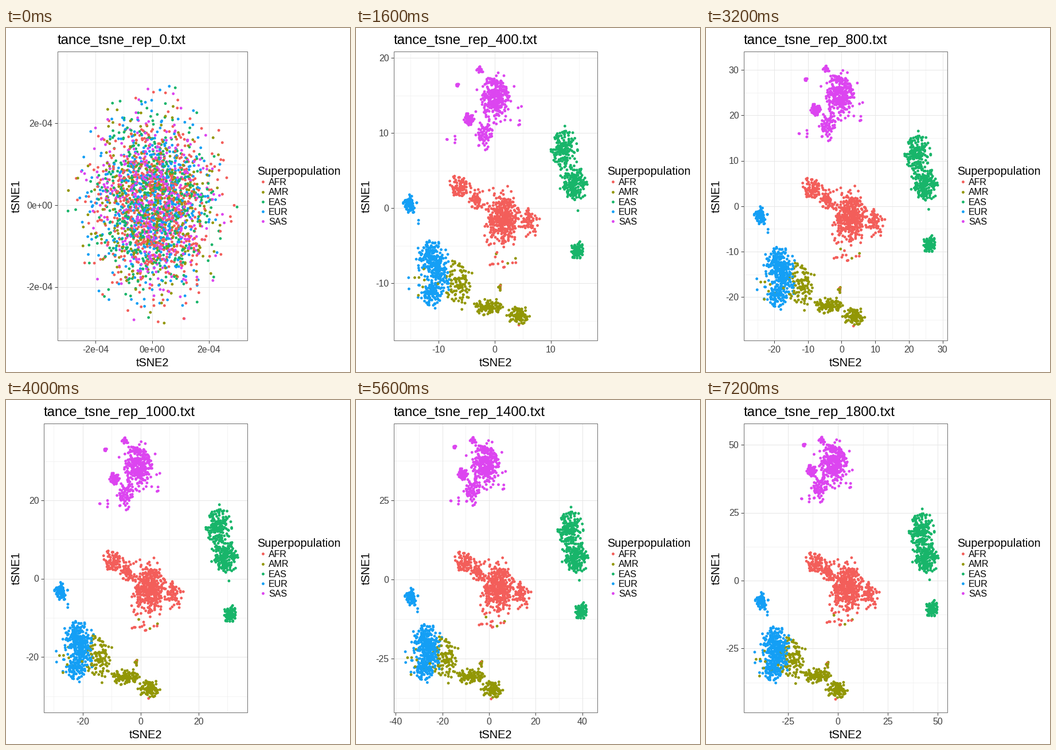
Recreate the animation shown at these times as a matplotlib script. Size 600 px wide and 600 px high, loop 8000 ms.

```python
import math

import matplotlib.pyplot as plt
import numpy as np
from matplotlib.animation import FuncAnimation
from matplotlib.patches import Rectangle

SIZE = 600
PT = 0.72  # points per pixel at 100 dpi
TOP, RIGHT, BOTTOM = 41, 421, 545
REPS = range(0, 2000, 200)
COLORS = {"AFR": "#F35E5A", "AMR": "#929705", "EAS": "#18B56A",
          "EUR": "#149FF5", "SAS": "#DC45F0"}
GREY = "#404040"

rng = np.random.default_rng(11)
early, middle, late, names = [], [], [], []


def spread(n, limit):
    """Normal scatter with the far points pulled in."""
    xy = rng.normal(size=(n, 2))
    r = np.hypot(*xy.T)[:, None]
    return np.where(r > limit, xy * 0.6, xy)


def cluster(pop, n, sd, a, b, c, first_sd=None, tilt=0):
    """Cloud centred at a (step 200), b (step 400) and c (step 1800)."""
    unit = spread(n, 2.5)
    first = unit * (first_sd or sd)
    first[:, 1] += tilt * first[:, 0]
    early.append(first + a)
    middle.append(unit * sd + b)
    late.append(unit * sd * 0.95 + c)
    names.extend([pop] * n)


cluster("AFR", 360, (13, 18), (251, 347), (256, 332), (246, 326))
cluster("AFR", 65, (19, 29), (250, 355), (252, 337), (242, 333))
cluster("AFR", 90, (8, 10), (169, 285), (181, 278), (191, 285), (8, 7), 0.6)
cluster("AFR", 60, (6, 9), (198, 313), (210, 299), (213, 299), (5, 5))
cluster("AFR", 70, (7, 12), (304, 343), (303, 338), (286, 340))
cluster("AFR", 9, (13, 5), (262, 420), (258, 412), (234, 387))
cluster("AFR", 3, (0.7, 3), (253, 466), (251, 455), (211, 464))
cluster("AFR", 1, (1, 1), (299, 501), (283, 517), (225, 521))

cluster("AMR", 105, (11, 19), (177, 456), (178, 446), (150, 452))
cluster("AMR", 110, (12, 7), (236, 503), (231, 488), (194, 482), (15, 4))
cluster("AMR", 115, (8.5, 7), (290, 498), (284, 501), (229, 505), (12, 2), -0.32)
cluster("AMR", 6, (1.5, 5), (250, 460), (251, 452), (212, 461))
cluster("AMR", 8, (14, 20), (118, 438), (121, 432), (105, 449))
cluster("AMR", 3, (12, 8), (255, 410), (257, 405), (235, 386))

cluster("EAS", 185, (10, 16), (361, 215), (362, 209), (375, 226))
cluster("EAS", 220, (10, 15), (379, 284), (380, 270), (383, 273))
cluster("EAS", 98, (5.3, 6.7), (390, 393), (386, 388), (394, 364), (1.2, 4))
cluster("EAS", 1, (1, 1), (385, 339), (386, 319), (389, 314))

cluster("EUR", 98, (5, 7.3), (81, 313), (94, 307), (97, 351), (2.4, 1.2), 1.6)
cluster("EUR", 195, (12, 15), (124, 396), (132, 401), (121, 424), (11, 11))
cluster("EUR", 100, (10, 11), (126, 473), (130, 463), (114, 469), (8, 9))
cluster("EUR", 105, (10, 15), (138, 438), (145, 432), (126, 448))
cluster("EUR", 2, (2, 5), (100, 348), (111, 340), (109, 374))
cluster("EUR", 2, (5, 25), (86, 430), (95, 420), (88, 425))

cluster("SAS", 260, (11, 19), (241, 161), (243, 121), (223, 110), (12, 17))
cluster("SAS", 55, (16, 24), (240, 160), (243, 128), (219, 114))
cluster("SAS", 65, (4, 5), (198, 206), (197, 160), (184, 124), (4, 1))
cluster("SAS", 75, (7, 11), (235, 225), (224, 186), (198, 153), (6, 11))
cluster("SAS", 18, (2.8, 3.2), (219, 65), (216, 73), (202, 70), (0.4, 0.4))
cluster("SAS", 8, (1.3, 1.3), (184, 169), (178, 100), (172, 79), (0.4, 0.4))
cluster("SAS", 5, (8, 6), (151, 211), (160, 191), (168, 169), (3, 0.3))
cluster("SAS", 5, (3, 22), (280, 225), (283, 163), (250, 147), (4, 20))

early, middle, late = (np.vstack(part) for part in (early, middle, late))
start = spread(len(names), 3) * (49.7, 71.3) + (255, 309)
order = rng.permutation(len(names))
dot_colors = [COLORS[names[k]] for k in order]


def growth(rep):
    """0 at step 400, 1 at step 1800, on a log scale."""
    return math.log(rep / 400) / math.log(4.5)


def positions(rep):
    if rep < 400:
        return early if rep else start
    return middle + (late - middle) * growth(rep)


def axes_for(rep):
    """Panel left edge, then zero pixel and data span of each axis."""
    if rep == 0:
        return 90, (255, 6.68e-4), (309, 7.06e-4)
    if rep == 200:
        return 61, (240, 15.6), (328, 18.4)
    grown = math.sqrt(rep) - 20
    y0 = np.interp(rep, [400, 600, 1800], [314.3, 310, 315])
    return (66, (242 - 12 * growth(rep), 36.2 + 2.93 * grown),
            (y0, 38.5 + 3.03 * grown))


def nice_step(span):
    """Break distance that gives three to six labels."""
    unit = 10 ** math.floor(math.log10(span))
    for limit, step in [(1.1, 0.25), (1.7, 0.4), (3, 0.5), (6.5, 1), (9, 2)]:
        if span / unit < limit:
            return step * unit
    return 2.5 * unit


def breaks(zero, span, lo, hi, sign=1):
    """Yield (pixel, value, is_major) at each half step inside the panel."""
    step = nice_step(span)
    for k in range(-10, 11):
        p = zero + sign * k / 2 * step * (hi - lo) / span
        if lo < p < hi:
            yield p, k // 2 * step, k % 2 == 0


fig = plt.figure(figsize=(6, 6), dpi=100, facecolor="white")
ax = fig.add_axes([0, 0, 1, 1])


def label(x, y, text, px, color="black", **kw):
    ax.text(x, y, text, fontsize=px * PT, color=color,
            family="Liberation Sans", va="baseline", **kw)


def line(xs, ys, color, px, z):
    ax.plot(xs, ys, color=color, lw=px * PT, zorder=z, solid_capstyle="butt")


def dots(xy, colors):
    ax.scatter(*np.transpose(xy), s=(4.8 * PT) ** 2, c=colors,
               linewidths=0, zorder=1)


def grid_style(major):
    return ("#E6E6E6", 1, 0.2) if major else ("#EFEFEF", 0.7, 0)


def draw_legend():
    label(438.5, 256, "Superpopulation", 20)
    for k, (pop, color) in enumerate(COLORS.items()):
        y = 268.3 + 17.28 * k
        dots([(447.5, y)], [color])
        label(458, y + 5.8, pop, 16)


def draw(i):
    rep = REPS[i]
    left, x_axis, y_axis = axes_for(rep)
    fmt = "{:g}" if rep else "{:.0e}"

    ax.cla()
    ax.set(xlim=(0, SIZE), ylim=(SIZE, 0))
    ax.axis("off")

    for x, value, major in breaks(*x_axis, left, RIGHT):
        line([x, x], [TOP, BOTTOM], *grid_style(major))
        if major:
            line([x, x], [BOTTOM, BOTTOM + 5], GREY, 1, 1)
            label(x, 566, fmt.format(value), 16, GREY, ha="center")
    for y, value, major in breaks(*y_axis, TOP, BOTTOM, sign=-1):
        line([left, RIGHT], [y, y], *grid_style(major))
        if major:
            line([left - 5, left], [y, y], GREY, 1, 1)
            label(left - 8.5, y + 5.7, fmt.format(value), 16, GREY, ha="right")

    dots(positions(rep)[order], dot_colors)
    ax.add_patch(Rectangle((left, TOP), RIGHT - left, BOTTOM - TOP, fill=False,
                           ec="#707070", lw=PT, zorder=2))

    label(left - 0.5, 28, f"tance_tsne_rep_{rep}.txt", 24)
    label((left + RIGHT) / 2, 590, "tSNE2", 20, ha="center")
    label(23.5, (TOP + BOTTOM) / 2, "tSNE1", 20, ha="center", rotation=90,
          rotation_mode="anchor")
    draw_legend()
    return []


anim = FuncAnimation(fig, draw, frames=len(REPS), init_func=lambda: [],
                     interval=800, repeat=True, repeat_delay=0)
plt.show()
```
